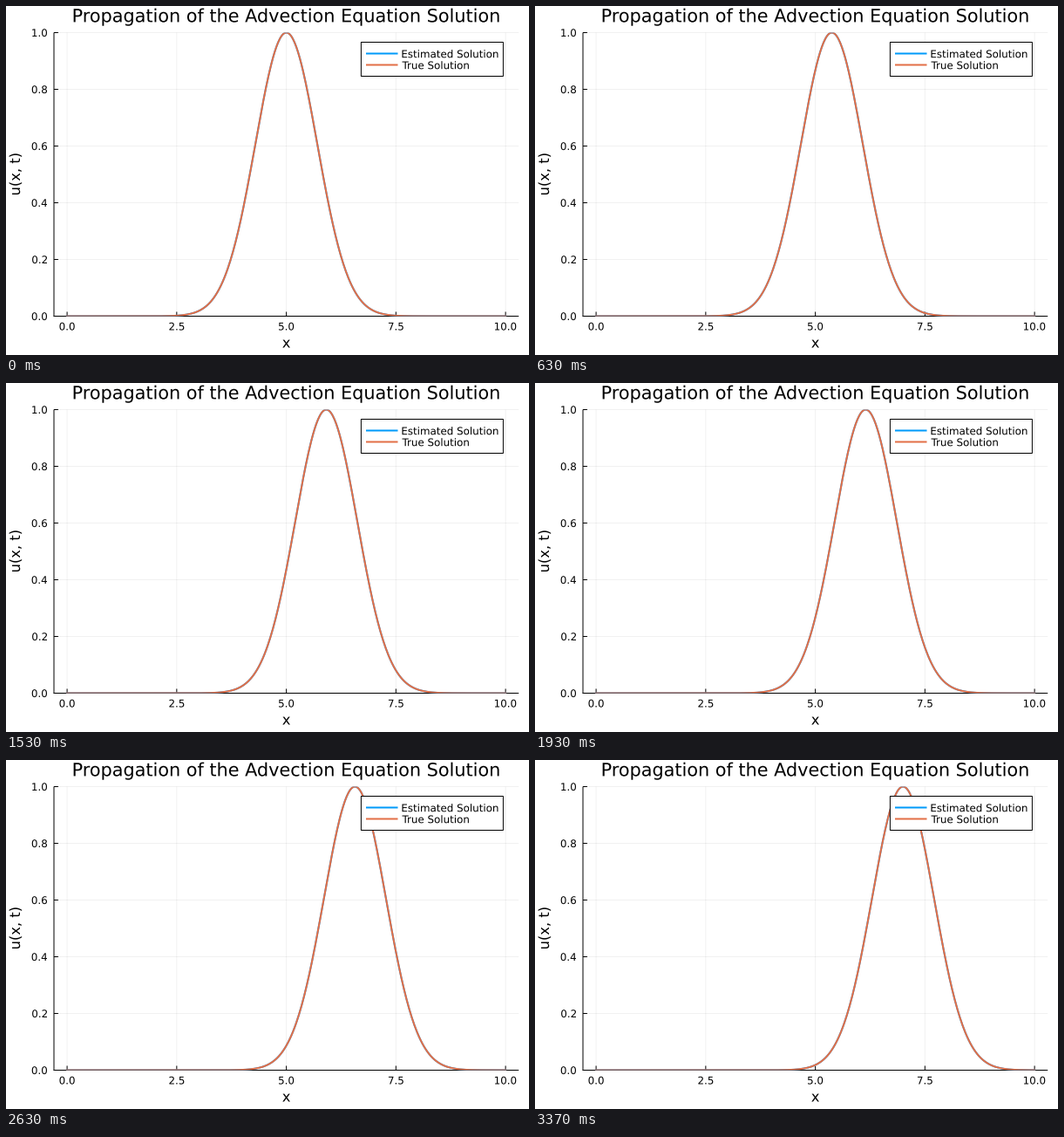
A matplotlib script for the animation above (3410 ms loop, 600 px wide and 400 px high).

```python
import matplotlib.pyplot as plt
import numpy as np
from matplotlib.animation import FuncAnimation
from matplotlib.collections import LineCollection
from matplotlib.patches import PathPatch, Rectangle
from matplotlib.path import Path
from matplotlib.textpath import TextPath
from matplotlib.transforms import Affine2D

W, H = 600, 400
PX = 0.72  # one pixel in points at 100 dpi
EM = 1.484  # pixels per font size unit
LEFT, RIGHT, TOP, BOTTOM = 55, 588.2, 30.5, 355.5
MIDDLE = (LEFT + RIGHT) / 2
BLUE, ORANGE = "#009AFA", "#E36F47"

TICK_MS = 10
LOOP_MS = 3410
STEPS = 101
SHIFT = 2.0  # distance travelled by the pulse in one loop

fig = plt.figure(figsize=(W / 100, H / 100), dpi=100, facecolor="white")
ax = fig.add_axes([0, 0, 1, 1])
ax.set_xlim(0, W)
ax.set_ylim(H, 0)
ax.axis("off")


def px(x):
    """Data x to pixels; the range 0..10 is padded by 3 % on both sides."""
    return LEFT + (x + 0.3) / 10.6 * (RIGHT - LEFT)


def py(u):
    return BOTTOM - u * (BOTTOM - TOP)


def text(s, size, x, y, align=0.5, angle=0):
    """Glyph outlines with the baseline at y, aligned at x (0 left, 1 right)."""
    path = TextPath((0, 0), s, size=size * EM, prop={"family": "DejaVu Sans"})
    box = path.get_extents()
    move = Affine2D().translate(-box.x0 - align * box.width, 0)
    return move.scale(1, -1).rotate_deg(-angle).translate(x, y).transform_path(path)


def add_text(paths, zorder):
    ax.add_patch(PathPatch(Path.make_compound_path(*paths), fc="black", lw=0,
                           snap=False, zorder=zorder))


def add_lines(segments, zorder, width=1.0, **style):
    ax.add_collection(LineCollection(segments, linewidths=width * PX, snap=False,
                                     zorder=zorder, **style), autolim=False)


# Grid, axes and tick marks
x_ticks = np.arange(0, 10.1, 2.5)
y_ticks = np.arange(6) / 5
grid = [[(px(x), TOP), (px(x), BOTTOM)] for x in x_ticks]
grid += [[(LEFT, py(u)), (RIGHT, py(u))] for u in y_ticks]
add_lines(grid, 1, colors="black", alpha=0.055)

frame = [[(LEFT, TOP), (LEFT, BOTTOM)], [(LEFT - 0.5, BOTTOM), (RIGHT, BOTTOM)]]
frame += [[(px(x), BOTTOM), (px(x), BOTTOM - 5)] for x in x_ticks]
frame += [[(LEFT, py(u)), (LEFT + 5, py(u))] for u in y_ticks]
add_lines(frame, 2, colors="black")

labels = [text(f"{x:.1f}", 8, px(x), 371.5) for x in x_ticks]
labels += [text(f"{u:.1f}", 8, 47, py(u) + 4.5, 1) for u in y_ticks]
labels += [
    text("Propagation of the Advection Equation Solution", 14, MIDDLE, 18.4),
    text("x", 11, MIDDLE, 391.5),
    text("u(x, t)", 11, 16, 192.7, angle=90),
]
add_text(labels, 3)

# Curves, clipped softly at the plot area
xs = np.linspace(0, 10, 506)
area = Path([(LEFT, TOP), (RIGHT, TOP), (RIGHT, BOTTOM), (LEFT, BOTTOM),
             (LEFT, TOP)], closed=True)
curves = []
for color in (BLUE, ORANGE):
    curve, = ax.plot(px(xs), py(0 * xs), color=color, lw=2 * PX, zorder=4,
                     snap=False)
    curve.set_clip_path(area, ax.transData)
    curves.append(curve)

# Legend
ax.add_patch(Rectangle((407.4, 41.5), 163, 39, fc="white", ec="black", lw=PX,
                       snap=False, zorder=5))
entries = [("Estimated Solution", BLUE, 54.5), ("True Solution", ORANGE, 67.5)]
for _, color, y in entries:
    add_lines([[(413, y), (449.5, y)]], 6, 2, colors=color)
add_text([text(name, 8, 454.5, y + 4.7, 0) for name, _, y in entries], 6)


def update(tick):
    # 30 steps per second, rounded to the 10 ms clock
    step = min(int((tick + 0.5) * 0.3), STEPS)
    center = 5 + SHIFT * step / STEPS
    u = np.exp(-(xs - center) ** 2)
    for curve in curves:
        curve.set_ydata(py(u))
    return curves


anim = FuncAnimation(fig, update, frames=LOOP_MS // TICK_MS, interval=TICK_MS,
                     repeat=True, repeat_delay=0, blit=False)
plt.show()
```
